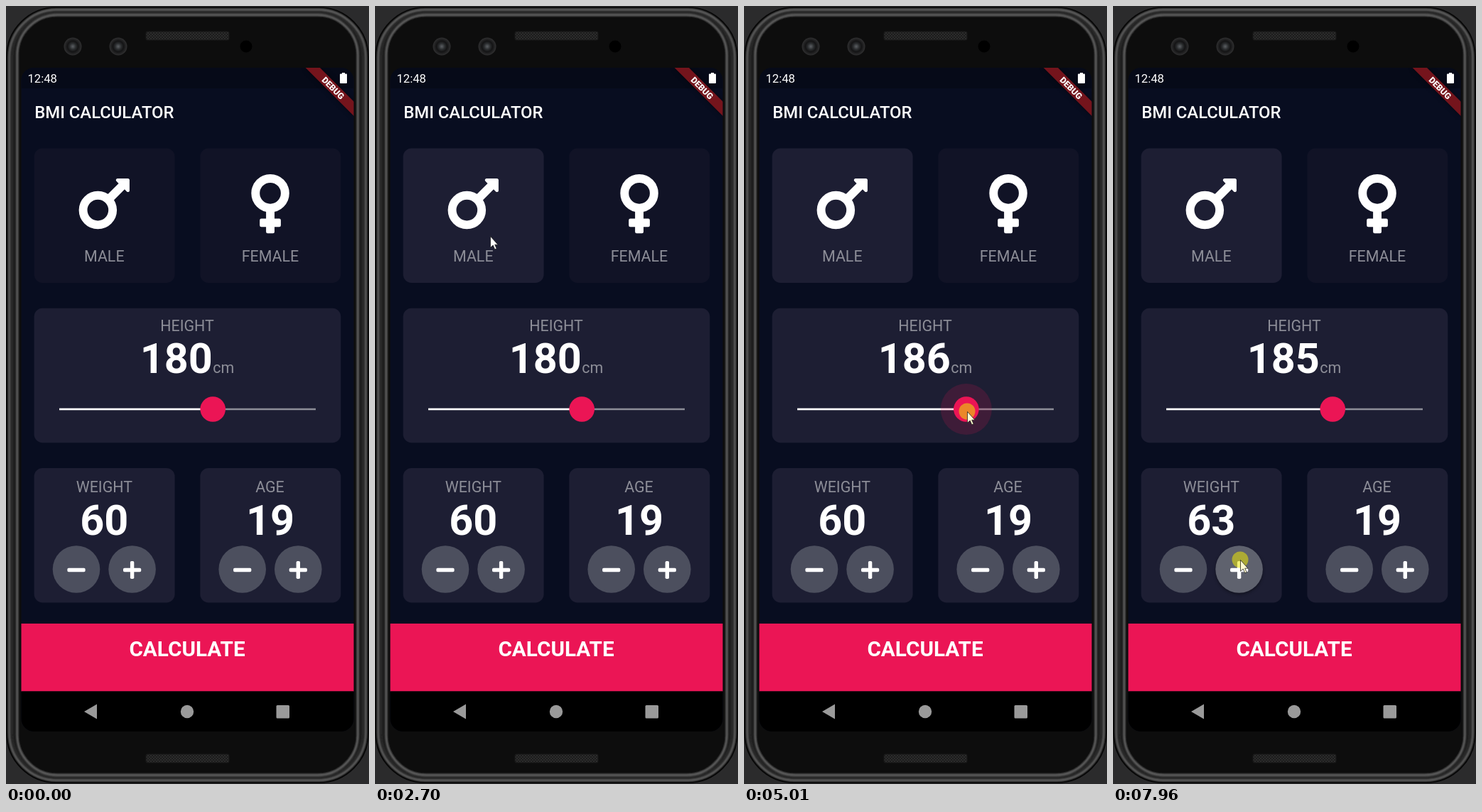
Animation of 511 by 1096 pixels, one loop 8000 ms. Source, as an HTML page:

```html
<!DOCTYPE html>
<html lang="en">
<head>
<meta charset="utf-8">
<title>BMI Calculator</title>
<style>
  html, body { margin: 0; width: 100%; height: 100%; overflow: hidden; background: #2b2b2c; }
  svg { display: block; width: 100vw; height: 100vh; }
  text { font-family: Roboto, sans-serif; fill: #fff; }
  .mid { text-anchor: middle; }
  .label { font-size: 21.4px; fill: #8d8e98; }
  .number { font-size: 59.4px; font-weight: 700; }
  .card { fill: #1d1e33; }
  .idle { fill: #111326; }
  .button { fill: #4c4f5e; }
  .button.down { fill: #5f626e; filter: drop-shadow(0 2px 2px #0006); }
  .icon { fill: #fff; }
  .ring { fill: none; stroke: #fff; stroke-width: 64; }
  .ribbon { fill: #74141c; filter: drop-shadow(0 0 3px #0008); }
  .rim { fill: none; }
</style>
</head>
<body>
<svg viewBox="0 0 511 1096" preserveAspectRatio="none">
  <defs>
    <clipPath id="screen"><rect x="21.5" y="87" width="468" height="935" rx="18"/></clipPath>
    <pattern id="mesh" width="4" height="4" patternUnits="userSpaceOnUse">
      <rect width="4" height="4" fill="#2c2c2c"/>
      <path d="M0 0l4 4M4 0l-4 4" stroke="#1c1c1c"/>
    </pattern>
    <radialGradient id="lens">
      <stop offset="0" stop-color="#5c6064"/>
      <stop offset=".35" stop-color="#2a2c2e"/>
      <stop offset=".6" stop-color="#141415"/>
      <stop offset="1" stop-color="#303031"/>
    </radialGradient>
    <filter id="soften" x="-5%" width="110%"><feGaussianBlur stdDeviation=".8"/></filter>
    <g id="speaker">
      <rect x="197" width="117" height="12" rx="2" fill="url(#mesh)" stroke="#191919"/>
    </g>
    <rect id="minus" x="-12.6" y="-2.7" width="25.2" height="5.4" rx="1.8" class="icon"/>
    <g id="plus">
      <use href="#minus"/>
      <use href="#minus" transform="rotate(90)"/>
    </g>
  </defs>

  <!-- Phone body -->
  <rect width="511" height="1096" fill="#2b2b2c"/>
  <rect x="1" y="2" width="509" height="1092" rx="70" fill="#161616" stroke="#050505" stroke-width="2"/>
  <g filter="url(#soften)">
    <rect class="rim" x="4.500" y="5" width="502" height="1086" rx="67" stroke="#6a6a6a" stroke-width="2.500"/>
    <rect class="rim" x="9" y="8.500" width="493" height="1079" rx="63" stroke="#262626" stroke-width="4"/>
    <rect x="15.500" y="12.500" width="480" height="1071" rx="57" fill="#090909" stroke="#6a6a6a" stroke-width="2.500"/>
  </g>
  <use href="#speaker" y="36"/>
  <use href="#speaker" y="1054"/>
  <circle cx="94" cy="57" r="12.5" fill="url(#lens)"/>
  <circle cx="158" cy="57" r="12.5" fill="url(#lens)"/>
  <circle cx="338" cy="57" r="8.5" fill="#000"/>

  <g clip-path="url(#screen)">
    <rect x="21" y="87" width="469" height="935" fill="#080d20"/>
    <rect x="21" y="87" width="469" height="29" fill="#060a18"/>
    <text x="30.500" y="108" font-size="16.65">12:48</text>
    <path class="ribbon" d="M421.700 87H442L490 135V155.300Z"/>
    <path class="icon" d="M473 94h4v1.500h2q1 0 1 1v11.500q0 1-1 1h-8q-1 0-1-1v-11.500q0-1 1-1h2z"/>
    <text x="40.300" y="158" font-size="23.8" font-weight="500">BMI CALCULATOR</text>
    <text class="mid" font-size="12.1" font-weight="900" transform="translate(460.400 115.600) rotate(45)" y="4.300">DEBUG</text>

    <!-- Gender -->
    <rect id="male" class="card idle" x="39.600" y="200.500" width="198" height="189.500" rx="11.900"/>
    <rect class="card idle" x="273.300" y="200.500" width="198" height="189.500" rx="11.900"/>
    <g transform="translate(102.600 231.100) scale(.1857)">
      <circle class="ring" cx="144" cy="304" r="112"/>
      <path class="icon" d="M372 64h-79c-10.700 0-16 12.900-8.500 20.400l16.900 16.900-95 95 45.300 45.300 95-95 16.900 16.900c7.600 7.600 20.400 2.200 20.400-8.500V76c0-6.600-5.400-12-12-12z"/>
    </g>
    <g transform="translate(345.300 231.100) scale(.1857)">
      <circle class="ring" cx="144" cy="176" r="112"/>
      <rect class="icon" x="112" y="300" width="64" height="180" rx="12"/>
      <rect class="icon" x="64" y="368" width="160" height="64" rx="12"/>
    </g>
    <text class="mid label" x="138.300" y="360">MALE</text>
    <text class="mid label" x="372" y="360">FEMALE</text>

    <!-- Height -->
    <rect class="card" x="39.600" y="425.700" width="431.700" height="189.500" rx="11.900"/>
    <text class="mid label" x="255" y="458">HEIGHT</text>
    <text id="height" class="number" x="188.700" y="517">180</text>
    <text class="label" x="291.300" y="517">cm</text>
    <path d="M75 568H436" stroke="#8d8e98" stroke-width="2.400"/>
    <path id="track" stroke="#fff" stroke-width="2.400"/>
    <g id="thumb">
      <circle id="halo" r="36" fill="#eb1555" fill-opacity=".16"/>
      <circle r="17.800" fill="#eb1555"/>
    </g>

    <!-- Weight and age -->
    <rect class="card" x="39.600" y="651" width="198" height="189.500" rx="11.900"/>
    <rect class="card" x="273.300" y="651" width="198" height="189.500" rx="11.900"/>
    <text class="mid label" x="138.300" y="685">WEIGHT</text>
    <text class="mid label" x="371.500" y="685">AGE</text>
    <text id="weight" class="mid number" x="138.300" y="745">60</text>
    <text class="mid number" x="372" y="745">19</text>
    <circle class="button" cx="99" cy="793.500" r="33.300"/>
    <circle id="add" class="button" cx="177.600" cy="793.500" r="33.300"/>
    <circle class="button" cx="332.700" cy="793.500" r="33.300"/>
    <circle class="button" cx="411.300" cy="793.500" r="33.300"/>
    <use href="#minus" x="99" y="794.500"/>
    <use href="#plus" x="177.600" y="794.500"/>
    <use href="#minus" x="332.700" y="794.500"/>
    <use href="#plus" x="411.300" y="794.500"/>

    <rect x="21" y="870" width="469" height="95.500" fill="#eb1555"/>
    <text class="mid" x="255" y="916" font-size="29.700" font-weight="700">CALCULATE</text>

    <!-- Navigation bar -->
    <rect x="21" y="965.500" width="469" height="57" fill="#000"/>
    <g fill="#9a9a9a">
      <path d="M110 994l18-10.500v21z"/>
      <circle cx="255" cy="994" r="9.200"/>
      <rect x="380.500" y="985" width="18.500" height="18.500" rx="1.500"/>
    </g>
  </g>

  <g id="pointer">
    <circle id="touch" r="11.500" fill="#ebe605" fill-opacity=".55"/>
    <path id="arrow" d="M.5.5V16.300L4.200 13l2.500 5.800 2.500-1-2.500-5.600H11z" stroke="#222" stroke-width=".8"/>
  </g>
</svg>

<script>
  const LOOP = 8000, TICKS_PER_MS = 0.013, LAST_TICK = 103;
  const TRACK_LEFT = 74.6, PX_PER_CM = 3.61, MIN_HEIGHT = 120;
  const $ = id => document.getElementById(id);

  // Pointer path: [tick, x, y]
  const path = [
    [6, 508, 1060], [8, 505, 930], [11, 473, 749], [13, 370, 580], [15, 215, 385], [16, 190, 349],
    [17, 181, 340], [19, 168, 332], [22, 162, 326], [24, 162, 324], [35, 162, 324],
    [38, 178, 368], [42, 268, 498], [45, 304, 551], [46, 297, 562], [48, 292, 569],
    [49, 292, 569], [53, 259.500, 569], [55, 259.500, 569], [56, 278.300, 569], [58, 293, 570],
    [61, 306, 571], [65, 314, 571], [71, 314, 571], [72, 313, 571], [76, 313, 571],
    [77, 311, 571], [83, 311, 571], [84, 308, 576], [88, 235, 690], [91, 183, 772], [92, 179, 780]
  ];
  // Ticks during which the pointer is held down: [from, to)
  const presses = [[29, 31], [49, 82], [93, 95], [96, 98], [99, 101], [102, 104]];
  const drag = presses[1], clicks = presses.slice(2);

  function pointerAt(n) {
    const i = path.findIndex(p => p[0] > n);
    if (i < 0) return path[path.length - 1].slice(1);
    const a = path[Math.max(i - 1, 0)], b = path[i];
    const k = Math.max(0, (n - a[0]) / (b[0] - a[0]));
    return [a[1] + (b[1] - a[1]) * k, a[2] + (b[2] - a[2]) * k];
  }

  function heightAt(n) {
    if (n < drag[0]) return 180;
    const [x] = pointerAt(Math.min(n, drag[1]));
    return Math.round(MIN_HEIGHT + (x - TRACK_LEFT) / PX_PER_CM);
  }

  function haloAt(n) {
    if (n < drag[0] || n > drag[1]) return 0;
    return n === drag[0] ? 0.6 : n === drag[1] ? 0.5 : 1;
  }

  const show = (id, on) => $(id).setAttribute('visibility', on ? 'visible' : 'hidden');
  const move = (id, x, y) => $(id).setAttribute('transform', `translate(${x} ${y})`);

  function draw(ms) {
    const n = Math.min(LAST_TICK, Math.floor((ms % LOOP) * TICKS_PER_MS + 0.1));
    const down = presses.some(([from, to]) => n >= from && n < to);
    const height = heightAt(n), thumbX = TRACK_LEFT + (height - MIN_HEIGHT) * PX_PER_CM;

    $('pointer').setAttribute('display', n < path[0][0] ? 'none' : 'inline');
    move('pointer', ...pointerAt(n));
    show('touch', down);
    $('arrow').setAttribute('fill', down ? '#fffbd0' : '#fff');

    $('male').classList.toggle('idle', n < presses[0][1]);
    $('height').textContent = height;
    $('track').setAttribute('d', `M75 568H${thumbX}`);
    move('thumb', thumbX, 568);
    $('halo').setAttribute('transform', `scale(${haloAt(n)})`);

    $('weight').textContent = 60 + clicks.filter(c => n >= c[1]).length;
    $('add').classList.toggle('down', n >= clicks[0][0]);
  }

  const start = performance.now();
  function frame() {
    draw(performance.now() - start);
    requestAnimationFrame(frame);
  }
  frame();
</script>
</body>
</html>
```
